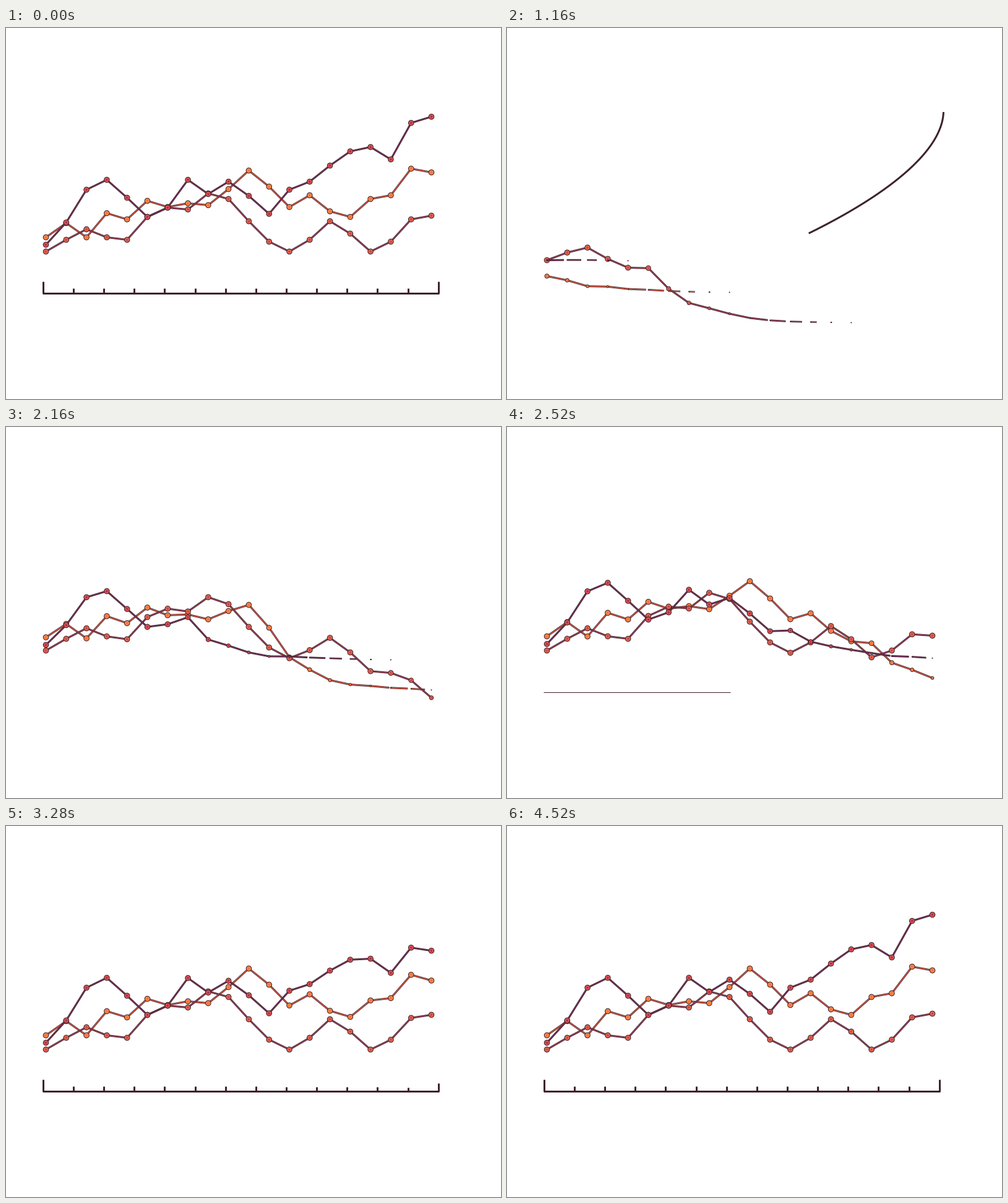
Recreate the animation shown at these times as a matplotlib script. Size 800 by 600 pixels, loop 5520 ms.

```python
import numpy as np
import matplotlib.pyplot as plt
from matplotlib.animation import FuncAnimation
from matplotlib.collections import LineCollection

W, H, DPI = 800, 600, 100
PX = 72 / DPI
STEP, FRAMES, LAST = 40, 138, 4520
DARK = '#3d222b'
N = 20
X = 64 + 623 / (N - 1) * np.arange(N)

# final heights, resting height, start time (ms), colours of link, dot and core
SERIES = [
    ([338, 315, 338, 299, 309, 279, 289, 283, 286, 260,
      230, 256, 289, 270, 296, 305, 276, 270, 227, 233],
     427, 424, '#dc5840', '#fb8442', '#f2714a'),
    ([361, 342, 325, 338, 342, 305, 290, 293, 267, 276,
      312, 345, 361, 342, 312, 332, 361, 345, 309, 303],
     476, -56, '#9a4058', '#e4624c', '#bd484f'),
    ([350, 314, 261, 245, 274, 305, 290, 245, 268, 248,
      271, 300, 261, 248, 222, 199, 192, 212, 153, 143],
     376, 780, '#763058', '#de504e', '#9c3350'),
]


def bezier(p0, p1, p2, p3, s):
    r = 1 - s
    return r**3 * p0 + 3 * r * r * s * p1 + 3 * r * s * s * p2 + s**3 * p3


S = np.linspace(0, 1, 400)


def make_ease(x1, y1, x2, y2):
    xs, ys = bezier(0, x1, x2, 1, S), bezier(0, y1, y2, 1, S)
    return lambda u: np.interp(u, xs, ys)


surge = make_ease(.7, .015, .035, .92)
ease = make_ease(.25, .1, .25, 1)


def smooth(u):
    u = np.clip(u, 0, 1)
    return u * u * (3 - 2 * u)


fig = plt.figure(figsize=(W / DPI, H / DPI), dpi=DPI, facecolor='white')
ax = fig.add_axes([0, 0, 1, 1])
ax.set_xlim(-.5, W - .5)
ax.set_ylim(H - .5, -.5)
ax.axis('off')


class Chart:
    """A chain of dots whose links grow from left to right."""

    def __init__(self, ys, rest, start, link, dot, core, z):
        self.ys, self.rest, self.start = np.array(ys), rest, start
        self.edge = LineCollection([], colors=DARK, zorder=z)
        self.link = LineCollection([], colors=link, zorder=z + .1)
        for c in (self.edge, self.link):
            ax.add_collection(c)
        self.discs = [ax.scatter([], [], color=c, linewidths=0, zorder=z + .2 + i / 10)
                      for i, c in enumerate((DARK, dot, core))]

    def update(self, t):
        age = t - self.start - 80 * np.arange(N)
        y = self.rest + (self.ys - self.rest) * surge(age / 2000)
        pts = np.column_stack([X, y])
        grow = ease((age[:-1] - 56) / 600)
        ends = pts[:-1] + (pts[1:] - pts[:-1]) * grow[:, None]
        on = grow > 0
        segs = np.stack([pts[:-1], ends], axis=1)[on]
        thick = 1.8 + 1.2 * np.clip(age[:-1][on] / 380, 0, 1)
        self.edge.set_segments(segs)
        self.edge.set_linewidths(thick * PX)
        self.link.set_segments(segs)
        self.link.set_linewidths(thick * .5 * PX)

        live = age > 0
        r = np.maximum(4.8 * smooth((age[live] - 60) / 920), 1)
        for disc, rad in zip(self.discs, (r, np.maximum(r - 1, 0), r * .34 * (r > 2.5))):
            disc.set_offsets(pts[live])
            disc.set_sizes((2 * rad * PX) ** 2)


class Axis:
    def __init__(self):
        self.base, = ax.plot([], [], color=DARK, solid_capstyle='butt', zorder=1)
        self.ticks = LineCollection([], colors=DARK, linewidths=3 * PX, zorder=1)
        ax.add_collection(self.ticks)
        self.xs = np.linspace(59.3, 698.3, 14)
        self.size = np.array([18.5] + [7.5] * 12 + [18.5])

    def update(self, t):
        y = 428.3
        width = 641.5 * surge((t - 2280) / 600)
        self.base.set_data([58, 58 + width], [y, y])
        self.base.set_linewidth((1 + 2 * smooth((t - 2500) / 600)) * PX)
        self.base.set_visible(t > 2280)
        h = self.size * surge((t - 2490 - 40 * np.arange(14)) / 600)
        self.ticks.set_segments([[(x, y), (x, y - d)]
                                 for x, d in zip(self.xs, h) if d > .2])


class Swoosh:
    """An arc that is drawn from its start, then wiped the same way."""

    def __init__(self):
        self.x = bezier(59, 346, 705, 705, S)
        self.y = bezier(476, 416, 262, 133, S)
        d = np.hypot(np.diff(self.x), np.diff(self.y))
        self.pos = np.append(0, np.cumsum(d)) / d.sum()
        self.line, = ax.plot([], [], color=DARK, lw=3 * PX,
                             solid_capstyle='butt', zorder=1)

    def update(self, t):
        head, tail = surge(t / 1200), surge((t - 776) / 900)
        p = np.linspace(tail, head, 160)
        self.line.set_data(np.interp(p, self.pos, self.x),
                           np.interp(p, self.pos, self.y))
        self.line.set_visible(head - tail > .002)


parts = [Swoosh(), Axis()]
parts += [Chart(*s, z=2 + i) for i, s in enumerate(SERIES)]


def draw(n):
    t = n * STEP
    if n == 0 or t >= LAST:
        t = 10000
    for part in parts:
        part.update(t)
    return []


anim = FuncAnimation(fig, draw, frames=FRAMES, interval=STEP,
                     init_func=lambda: draw(0), repeat=True, repeat_delay=0)
plt.show()
```
